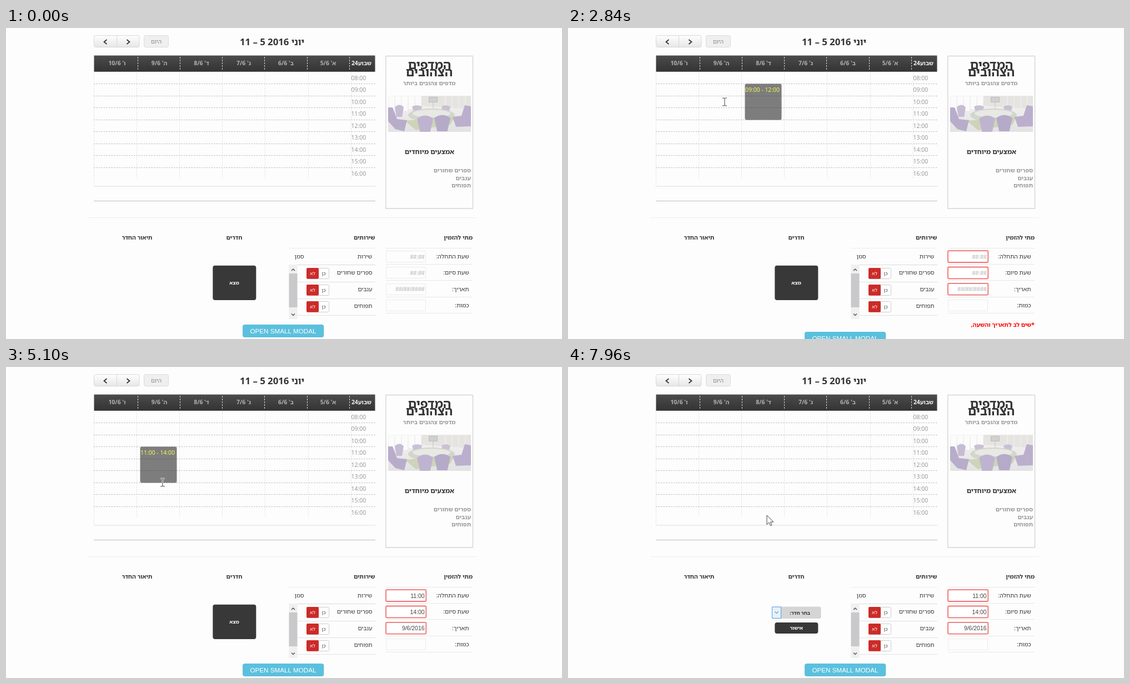
These frames come from a looping animation (1001 by 560 pixels, 8000 ms). An HTML page with a canvas:

```html
<!DOCTYPE html>
<html lang="he">
<head>
<meta charset="utf-8">
<title>הזמנת חדר</title>
<style>
html, body { margin: 0; width: 100%; height: 100%; overflow: hidden; background: #fdfdfd; }
canvas { display: block; }
</style>
</head>
<body>
<canvas id="stage" width="1001" height="560"></canvas>
<script>
const ctx = document.getElementById('stage').getContext('2d');
const LOOP = 8000, ROW = 21.5, TOP = 79;
const SANS = '"Open Sans", "Noto Sans Hebrew", "Liberation Sans", sans-serif';
const ARIAL = '"Liberation Sans", Arial, sans-serif';

// Cursor moves: first step, last step, step count, end point, shape
const START = [839, 650];
const MOVES = [
  [130, 370, 4, 436, 157, 'arrow'],
  [600, 910, 5, 328, 118, 'arrow'],
  [1140, 1450, 5, 331, 149, 'arrow'],
  [1920, 2200, 5, 474, 428, 'arrow'],
  [2270, 2680, 6, 287, 138, 'beam'],
  [2760, 2838, 2, 282, 133, 'beam'],
  [4010, 4160, 3, 280, 152, 'beam'],
  [4400, 4940, 8, 282, 208, 'beam'],
  [5480, 5640, 3, 542, 380, 'arrow'],
  [6030, 6260, 4, 444, 448, 'arrow'],
  [6337, 6490, 3, 428, 451, 'arrow'],
  [7730, 7883, 3, 277, 295, 'arrow'],
  [7960, 7960, 1, 358, 267, 'arrow']
];
// Selected slot: time, left edge, first hour, last hour
const SLOTS = [
  [0], [1140, 318.5, 9, 10], [1217, 318.5, 9, 11], [1372, 318.5, 9, 12],
  [2990], [3070, 241.5, 10, 11], [4085], [4160, 241.5, 11, 12],
  [4477, 241.5, 11, 13], [4709, 241.5, 11, 14], [6950]
];

const latest = (list, t) => list.filter(item => item[0] <= t).pop();
const rowY = hour => TOP + (hour - 8) * ROW;
const clock = hour => String(hour).padStart(2, '0') + ':00';

function text(s, x, y, { size = 10.43, color = '#333', align = 'right', weight = 400, font = SANS } = {}) {
  ctx.font = `${weight} ${size}px ${font}`;
  ctx.direction = /[א-ת]/.test(s) ? 'rtl' : 'ltr';
  ctx.textAlign = align;
  ctx.fillStyle = color;
  ctx.fillText(s, x, y);
}

function box(x, y, w, h, fill, r = 0, stroke, width = 1) {
  ctx.beginPath();
  ctx.roundRect(x, y, w, h, r);
  if (fill) { ctx.fillStyle = fill; ctx.fill(); }
  if (stroke) { ctx.strokeStyle = stroke; ctx.lineWidth = width; ctx.stroke(); }
}

function line(points, color, width = 1, dash = []) {
  ctx.beginPath();
  points.forEach(([x, y]) => ctx.lineTo(x, y));
  ctx.strokeStyle = color;
  ctx.lineWidth = width;
  ctx.setLineDash(dash);
  ctx.stroke();
  ctx.setLineDash([]);
}

const hline = (x1, x2, y, color, dash) => line([[x1, y], [x2, y]], color, 1, dash);
const vline = (x, y1, y2, color, dash) => line([[x, y1], [x, y2]], color, 1, dash);

function shade(y, h, from, to) {
  const g = ctx.createLinearGradient(0, y, 0, y + h);
  g.addColorStop(0, from);
  g.addColorStop(1, to);
  return g;
}

function shape(fill, points) {
  ctx.beginPath();
  points.forEach(([x, y]) => ctx.lineTo(x, y));
  ctx.fillStyle = fill;
  ctx.fill();
}

function oval(x, y, rx, ry, fill) {
  ctx.beginPath();
  ctx.ellipse(x, y, rx, ry, 0, 0, 7);
  ctx.fillStyle = fill;
  ctx.fill();
}

function toolbar() {
  box(158.5, 13.5, 81.5, 21, shade(13, 22, '#fff', '#e6e6e6'), 3, '#d8d8d8');
  vline(199.5, 14, 35, '#d8d8d8');
  line([[181.5, 21], [176.5, 25], [181.5, 29]], '#333', 1.8);
  line([[217.5, 21], [222.5, 25], [217.5, 29]], '#333', 1.8);
  box(248.5, 13.5, 44, 21, '#efeff0', 3, '#dcdcdc');
  text('היום', 270.5, 28, { size: 10, color: '#8a8078', align: 'center' });
  text('יוני 2016 5 – 11', 479, 31, { size: 16.8, align: 'center', weight: 700 });
}

function calendar() {
  box(158.5, 49.5, 506, 29.3, shade(49, 30, '#4c4c4c', '#333'));
  ["ו' 10/6", "ה' 9/6", "ד' 8/6", "ג' 7/6", "ב' 6/6", "א' 5/6"].forEach((day, i) => {
    text(day, 200 + 76 * i, 67, { color: '#b0b0b0', align: 'center', weight: 700 });
    vline(Math.floor(237 + 76.3 * i) + .5, 52, 77, '#ddd', [3, 2]);
    vline(Math.floor(158 + 77.2 * i) + .5, 80, i ? 272 : 285, '#dedede', [2, 2]);
  });
  vline(621.5, 80, 272, '#dedede', [2, 2]);
  text('שבוע24', 658, 67, { color: '#eee', weight: 700 });
  for (let h = 8; h < 17; h++) {
    if (h > 8) hline(158, 665, Math.floor(rowY(h)) + .5, '#bbb', [2.5, 2]);
    text(clock(h), 621.5, rowY(h) + 14.8, { color: '#929292', align: 'left' });
  }
  hline(158, 665, 285, '#dedede');
  hline(158, 665, 311.5, '#bdbdbd');
}

function chair(x, y, w, h, color) {
  ctx.beginPath();
  ctx.moveTo(x, y + h * .2);
  ctx.quadraticCurveTo(x + w / 2, y - h * .15, x + w, y + h * .2);
  ctx.lineTo(x + w * .82, y + h);
  ctx.lineTo(x + w * .18, y + h);
  ctx.fillStyle = color;
  ctx.fill();
}

function photo() {
  ctx.save();
  ctx.beginPath();
  ctx.rect(688, 122, 149, 65);
  ctx.clip();
  box(688, 122, 149, 65, shade(122, 65, '#f4f4f3', '#e2e2e2'));
  for (let i = 0; i < 5; i++) box(689 + i * 12, 123, 10, 32 - i * 3, '#fbfbfb');
  shape('#e6e4e1', [[748, 122], [837, 122], [837, 146], [748, 140]]);
  for (let i = 0; i < 4; i++) vline(791 + i * 12, 122, 145, '#f3f2f0');
  box(761.5, 124.5, 15, 9, '#d0d0d0', 0, '#bcbcbc');
  vline(769, 134, 145, '#c5c5c5');
  chair(700, 138, 16, 22, '#c6bcd4');
  chair(731, 139, 18, 13, '#c9c0d5');
  chair(784, 139, 16, 14, '#c9c0d5');
  oval(766, 157, 42, 12, '#d3d6cc');
  oval(766, 154, 34, 7, '#e8e8e4');
  shape('#cdd4b8', [[718, 167], [808, 160], [800, 174], [738, 184]]);
  shape('#b8accb', [[688, 143], [696, 143], [704, 164], [722, 166], [717, 186], [701, 182], [688, 168]]);
  chair(740, 157, 29, 30, '#bfb4cf');
  chair(771, 156, 29, 30, '#b6aac9');
  shape('#bbafcd', [[826, 139], [837, 141], [837, 177], [810, 178], [804, 160], [820, 158]]);
  ctx.restore();
}

function card() {
  box(683.8, 50.5, 156.7, 274.5, '#fdfdfd', 0, '#d6d6d6', 1.4);
  const mid = { align: 'center', weight: 700 };
  text('המדפים', 762.5, 73.5, { ...mid, size: 22 });
  text('הצהובים', 762, 87, { ...mid, size: 22 });
  text('מדפים צהובים ביותר', 762, 103, { ...mid, color: '#999' });
  photo();
  text('אמצעים מיוחדים', 762.5, 227, { ...mid, size: 11.92 });
  ['ספרים שחורים', 'ענבים', 'תפוחים'].forEach((s, i) =>
    text(s, 837, 260 + 13.5 * i, { color: '#999', weight: 700 }));
}

function services() {
  hline(509, 665, 396.5, '#ececec');
  hline(509, 665, 426.5, '#dadada');
  text('שירות', 659, 415);
  text('סמן', 536.5, 415);
  ['ספרים שחורים', 'ענבים', 'תפוחים'].forEach((s, i) => {
    const y = 432 + 30 * i;
    text(s, 659.5, y + 12);
    hline(525, 665, y + 25.5, '#e2e2e2');
    box(541.5, y + .5, 40, 19, '#fff', 2, '#ccc');
    box(541, y, 22, 19.7, '#cb2b28', 2);
    text('לא', 552, y + 13, { size: 8.2, color: '#fff', align: 'center' });
    text('כן', 572, y + 13, { size: 8.2, align: 'center' });
  });
  box(509.5, 426, 15, 98, '#f0f0f0');
  box(509.5, 442, 15, 61, '#c9c9cc');
  line([[514, 437], [517, 434], [520, 437]], '#555', 1.5);
  line([[514, 514.5], [517, 517.5], [520, 514.5]], '#555', 1.5);
}

function form(t) {
  const error = t >= 1620, filled = t >= 3400;
  const values = !filled ? ['##:##', '##:##', '##/##/####']
    : [...(t < 5100 ? ['10:00', '11:00'] : ['11:00', '14:00']), '9/6/2016'];
  for (let i = 0; i < 5; i++) hline(684, 840, Math.floor(396 + 29.4 * i) + .5, '#e8e8e8');
  ['שעת התחלה:', 'שעת סיום:', 'תאריך:', 'כמות:'].forEach((label, i) => {
    const y = 411.5 + 29.3 * i;
    text(label, 833.5, y + 3.5);
    if (error && i < 3) box(684, y - 10.3, 72.3, 20.8, '#fff', 1.5, '#f17070', 1.8);
    else box(684.5, Math.floor(y - 10) + .5, 71, 20, '#fdfdfd', 0, '#ebebeb');
    if (i < 3) text(values[i], 753.5, y + 4, { color: filled ? '#444' : '#aaa', font: ARIAL });
  });
  const alert = error && !filled;
  if (alert) text('*שים לב לתאריך והשעה,', 840, 537.5, { color: '#f00', weight: 700 });
  const y = alert ? 547 : 534;
  box(426, y, 146.3, 23, '#5bc0de', 4);
  text('OPEN SMALL MODAL', 499, y + 15.6, { size: 11.65, color: '#fff', align: 'center', font: ARIAL });
}

function rooms(t) {
  const white = { size: 8.9, color: '#fff', align: 'center', weight: 600 };
  if (t < 7100) {
    const fade = Math.min(1, Math.max(0, (t - 6300) / 190));
    box(372.3, 427.7, 78, 62.3, `rgba(56,56,56,${1 - fade / 2})`, 4);
    text('מצא', 411, 462, white);
    return;
  }
  ctx.globalAlpha = t < 7190 ? .5 : 1;
  box(367.5, 431.5, 88, 21.5, '#d5d5d5', 3);
  box(367.5, 432, 16, 20.5, '#e5f1fb', 0, '#569de5');
  line([[372.5, 440.5], [375.5, 443.5], [378.5, 440.5]], '#444');
  text('בחר חדר:', 436, 445.5, { size: 8.9, weight: 700 });
  box(372.3, 460, 78, 20, '#383838', 4);
  text('אישור', 411.3, 473, white);
  ctx.globalAlpha = 1;
}

function selection(t) {
  const [, x, from, to] = latest(SLOTS, t);
  if (!x) return;
  box(x, rowY(from), 66, (to - from) * ROW + .5, 'rgba(40,40,40,.6)', 3);
  text(`${clock(from)} - ${clock(to)}`, x + .5, rowY(from) + 14.8, { color: '#ffff4d', align: 'left' });
}

const POINTERS = {
  arrow: new Path2D('M0 0V16.5L4 13L6.6 18.6L9 17.5L6.4 12H12Z'),
  beam: new Path2D('M-4-7H-1L0-6L1-7H4M0-6V6M-4 7H-1L0 6L1 7H4'),
  hand: new Path2D('M0 0Q1.8 0 1.8 2V7.5Q4.6 6.6 5 8.5Q7.4 7.8 7.8 9.5Q10 9 10 11V15L8 20H-.5L-4.5 13.5Q-5 10.8-1.8 12V2Q-1.8 0 0 0Z')
};

function cursor(t) {
  let [x, y] = START, kind = 'arrow';
  for (const [t0, t1, n, endX, endY, name] of MOVES) {
    if (t < t0) break;
    const step = t >= t1 ? n : 1 + Math.floor((t - t0) / (t1 - t0) * (n - 1));
    x += (endX - x) * step / n;
    y += (endY - y) * step / n;
    kind = name;
  }
  if (t < 7190 && x > 372 && x < 450 && y > 428 && y < 490) kind = 'hand';
  ctx.save();
  ctx.translate(x, y);
  const path = POINTERS[kind];
  if (kind === 'beam') {
    ctx.strokeStyle = '#fff';
    ctx.lineWidth = 2.6;
    ctx.stroke(path);
  } else {
    ctx.fillStyle = '#fff';
    ctx.fill(path);
  }
  ctx.strokeStyle = '#444';
  ctx.lineWidth = 1;
  ctx.stroke(path);
  ctx.restore();
}

function draw(now) {
  const t = now % LOOP;
  box(0, 0, 1001, 560, '#fdfdfd');
  toolbar();
  calendar();
  selection(t);
  card();
  hline(148, 848, 341.5, '#eee');
  const bold = { weight: 700 };
  text('מתי להזמין', 840, 381, bold);
  text('שירותים', 664.5, 381, bold);
  text('חדרים', 411, 381, { ...bold, align: 'center' });
  text('תיאור החדר', 236, 381, { ...bold, align: 'center' });
  services();
  form(t);
  rooms(t);
  cursor(t);
  requestAnimationFrame(draw);
}
requestAnimationFrame(draw);
</script>
</body>
</html>
```
